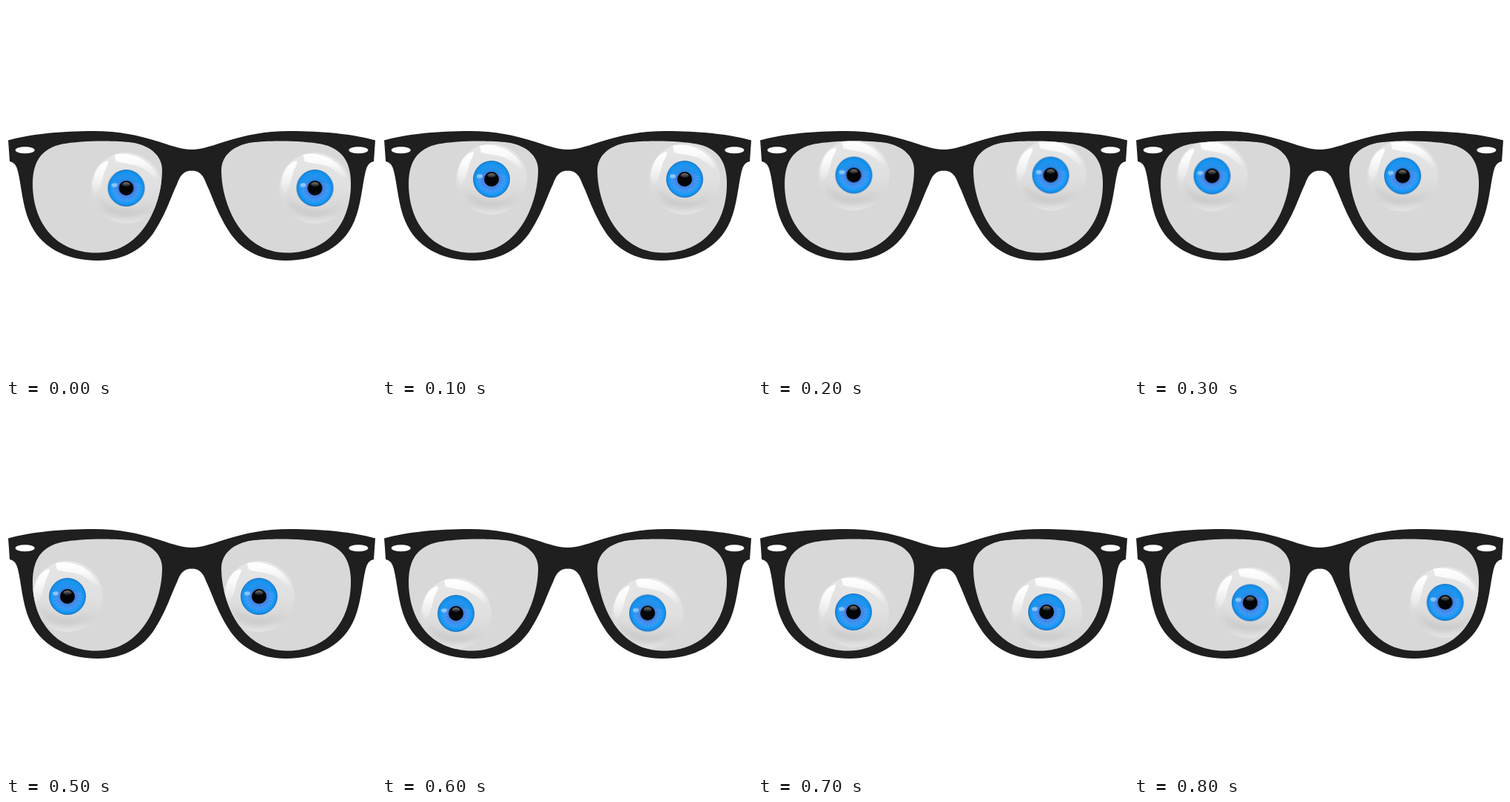
These frames come from a looping animation (500 px wide and 500 px high, 900 ms). An HTML page:

```html
<!DOCTYPE html>
<html lang="en">
<head>
<meta charset="utf-8">
<title>Rolling eyes</title>
<style>
  html, body { margin: 0; width: 100%; height: 100%; overflow: hidden; background: #fff; }
  svg { display: block; width: 100%; height: 100%; }
  .left, .right { animation: roll-left 900ms step-end infinite; }
  .right { animation-name: roll-right; }

  @keyframes roll-left {
    0% { transform: translate(162.5px, 246px); }
    11.111% { transform: translate(148px, 234px); }
    22.222% { transform: translate(129.5px, 228.5px); }
    33.333% { transform: translate(105.5px, 229.5px); }
    44.444% { transform: translate(88px, 241px); }
    55.555% { transform: translate(83px, 260px); }
    66.666% { transform: translate(100px, 283px); }
    77.777% { transform: translate(129px, 281px); }
    88.888%, 100% { transform: translate(157px, 268.5px); }
  }
  @keyframes roll-right {
    0% { transform: translate(417.5px, 246px); }
    11.111% { transform: translate(409px, 234px); }
    22.222% { transform: translate(395.5px, 228.5px); }
    33.333% { transform: translate(363px, 229.5px); }
    44.444% { transform: translate(347px, 241px); }
    55.555% { transform: translate(342px, 260px); }
    66.666% { transform: translate(359px, 282.5px); }
    77.777% { transform: translate(390px, 281px); }
    88.888%, 100% { transform: translate(420.5px, 268px); }
  }
</style>
</head>
<body>
<svg viewBox="0 0 500 500">
  <defs>
    <linearGradient id="white" x2="0" y2="1">
      <stop offset="0" stop-color="#e6e6e6"/>
      <stop offset=".5" stop-color="#e0e0e0"/>
      <stop offset=".85" stop-color="#d6d6d6"/>
      <stop offset="1" stop-color="#e4e4e4"/>
    </linearGradient>
    <linearGradient id="gloss" x2="0" y2="1">
      <stop offset="0" stop-color="#fff"/>
      <stop offset=".4" stop-color="#fff" stop-opacity=".8"/>
      <stop offset="1" stop-color="#fff" stop-opacity=".1"/>
    </linearGradient>
    <radialGradient id="blue">
      <stop offset=".38" stop-color="#3f78dc"/>
      <stop offset=".65" stop-color="#3a93f2"/>
      <stop offset=".85" stop-color="#189bf8"/>
      <stop offset="1" stop-color="#1583dc"/>
    </radialGradient>
    <linearGradient id="shine" x2="0" y2="1">
      <stop offset="0" stop-color="#777"/>
      <stop offset="1" stop-color="#1a1a1a"/>
    </linearGradient>
    <filter id="soft" x="-40%" y="-40%" width="180%" height="180%"><feGaussianBlur stdDeviation="3"/></filter>

    <path id="lens" d="M36 240C36 208 50 192 76 186.5C98 182 146 181 170 184.5C196 188.5 211 203 211 222C211 262 188 333.5 122 333.5C66 333.5 36 292 36 240Z"/>
    <clipPath id="lenses">
      <use href="#lens"/>
      <use href="#lens" transform="matrix(-1 0 0 1 502 0)"/>
    </clipPath>

    <g id="eye">
      <circle r="48" fill="url(#white)"/>
      <path d="M-38 12C-28 46 20 48 36 18C24 36-20 34-38 12Z" fill="#c9c9c9" opacity=".8" filter="url(#soft)"/>
      <path d="M-46-4C-44-22-37-34-25-37C-22-34-28-27-30-20C-33-8-36 6-43 8Z" fill="url(#gloss)"/>
      <path d="M-16-45C8-51 36-36 43-14C37-12 34-18 28-23C16-33 0-32-14-36Z" fill="url(#gloss)"/>

      <circle r="24.5" fill="url(#blue)" stroke="#1769b8" stroke-width=".8"/>
      <circle r="15" fill="none" stroke="#7db9ff" stroke-opacity=".3" stroke-width="9" stroke-dasharray=".9 2.7"/>
      <path d="M-22-4A22.4 22.4 0 0 1 22-4Q0-12-22-4Z" fill="#1190ea" opacity=".55"/>
      <circle r="10" fill="#030507"/>
      <ellipse cy="-5" rx="5.5" ry="3" fill="url(#shine)"/>
      <ellipse cx="-16" cy="-4" rx="4" ry="2.8" fill="#bfe3ff" opacity=".6"/>
    </g>

    <path id="half" d="M251.5 194C221 194 190 169 118 169C75 169 33 173 3 181.5L5 210Q13 211 16 223C21 244 22 268 31 290C45 325 80 344 124 344C160 344 186 328 201 304C217 279 224 255 231 241C235 230 239 222.5 251.5 222.5Z"/>
  </defs>

  <g fill="#1f1f1f">
    <use href="#half"/>
    <use href="#half" transform="matrix(-1 0 0 1 502 0)"/>
  </g>
  <g fill="#d8d8d8">
    <use href="#lens"/>
    <use href="#lens" transform="matrix(-1 0 0 1 502 0)"/>
  </g>
  <g fill="#fff">
    <ellipse cx="25.7" cy="194.7" rx="13" ry="4.5"/>
    <ellipse cx="476.3" cy="194.7" rx="13" ry="4.5"/>
  </g>
  <g clip-path="url(#lenses)">
    <use class="left" href="#eye"/>
    <use class="right" href="#eye"/>
  </g>
</svg>
</body>
</html>
```
